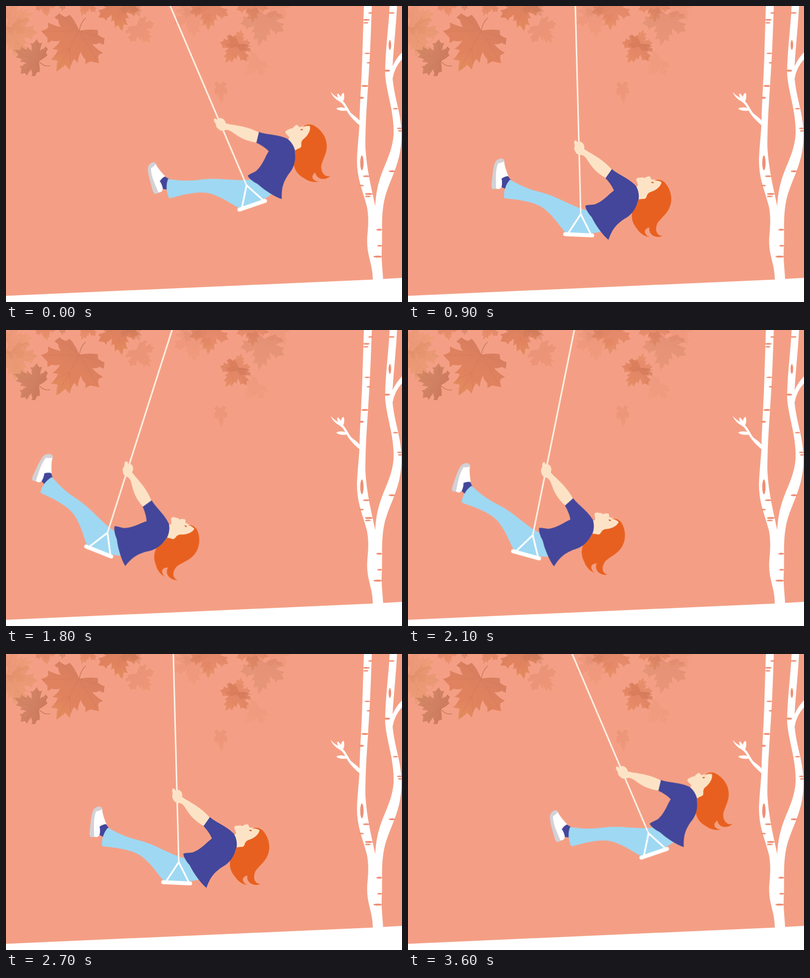
These frames come from a looping animation (800 px wide and 600 px high, 3.9 s). An HTML page:

```html
<!DOCTYPE html>
<html lang="en">
<head>
<meta charset="utf-8">
<title>Autumn swing</title>
<style>
  html, body { margin: 0; width: 100%; height: 100%; overflow: hidden; background: #f49f85; }
  svg { display: block; width: 800px; height: 600px; }

  /* Thirteen held poses per loop, there and back */
  #swing {
    transform-origin: 349px 422px;
    animation: swing 3.9s step-end infinite;
  }
  @keyframes swing {
    0%, 92.307%, 100%  { transform: translate(137px, -58.5px) rotate(-21.5deg); }
    7.692%, 84.615%    { transform: translate(92px, -39px) rotate(-14.6deg); }
    15.384%, 76.923%   { transform: translate(51px, -28.5px) rotate(-8.4deg); }
    23.076%, 69.23%    { transform: none; }
    30.769%, 61.538%   { transform: translate(-48px, -1px) rotate(6.3deg); }
    38.461%, 53.846%   { transform: translate(-97px, -6px) rotate(12.9deg); }
    46.153%            { transform: translate(-144px, -11px) rotate(19.1deg); }
  }

  .skin { fill: #fde3c6; }
  .navy { fill: #43469a; }
  .hair { fill: #e8601f; }
  .line { fill: none; stroke: #fff; stroke-linecap: round; stroke-linejoin: round; }
  .veins { fill: none; stroke: #b9623f; stroke-width: 1.2; opacity: .4; }
  .stem { fill: none; stroke: #c27a5c; stroke-width: 1.4; }
  .bark { fill: #f08f74; }
</style>
</head>
<body>
<svg viewBox="0 0 800 600" xmlns="http://www.w3.org/2000/svg">
  <defs>
    <linearGradient id="rust" gradientUnits="userSpaceOnUse" x1="0" y1="10" x2="0" y2="-100">
      <stop offset="0" stop-color="#cf7452"/>
      <stop offset=".55" stop-color="#db7850"/>
      <stop offset="1" stop-color="#de8850"/>
    </linearGradient>
    <linearGradient id="brown" gradientUnits="userSpaceOnUse" x1="0" y1="10" x2="0" y2="-100">
      <stop offset="0" stop-color="#bf6f52"/>
      <stop offset="1" stop-color="#cb8260"/>
    </linearGradient>
    <linearGradient id="gold" gradientUnits="userSpaceOnUse" x1="0" y1="10" x2="0" y2="-100">
      <stop offset="0" stop-color="#d98a5e"/>
      <stop offset="1" stop-color="#e39c60"/>
    </linearGradient>
    <path id="half" d="M-.4 -100H0Q7 -88 9 -78L23 -83Q18 -69 20 -58L31 -62Q25 -50 25 -38Q33 -46 41 -47L46 -56L52 -46L71 -40Q63 -33 61 -26L67 -17Q52 -17 38 -12Q47 -8 50 -2L60 -1L55 12Q44 10 39 12L34 20Q17 14 0 0H-.4Z"/>
    <g id="leaf">
      <use href="#half"/>
      <use href="#half" transform="scale(-1 1)"/>
      <path class="veins" d="M0 0V-94M0 0L64 -37M0 0L-64 -37M0 0L49 9M0 0L-49 9M0 -42L19 -72M0 -42L-19 -72"/>
    </g>
  </defs>

  <rect width="800" height="600" fill="#f49f85"/>

  <g id="leaves">
    <use href="#leaf" fill="url(#gold)" opacity=".4" transform="translate(10 44) rotate(160) scale(.68)"/>
    <use href="#leaf" fill="url(#gold)" opacity=".3" transform="translate(5 28) rotate(75) scale(.52)"/>
    <use href="#leaf" fill="url(#rust)" opacity=".45" transform="translate(78 -8) rotate(170) scale(.3)"/>
    <use href="#leaf" fill="url(#brown)" opacity=".5" transform="translate(116 -18) rotate(185) scale(.29)"/>
    <use href="#leaf" fill="url(#rust)" opacity=".5" transform="translate(166 -10) rotate(205) scale(.33)"/>
    <use href="#leaf" fill="url(#rust)" opacity=".7" transform="translate(224 -8) rotate(170) scale(.6)"/>
    <use href="#leaf" fill="url(#brown)" opacity=".35" transform="translate(250 -14) rotate(150) scale(.42)"/>
    <use href="#leaf" fill="url(#rust)" opacity=".25" transform="translate(264 40) rotate(142) scale(.45)"/>
    <use href="#leaf" fill="url(#rust)" opacity=".72" transform="translate(148 50) rotate(209) scale(.95)"/>
    <path class="stem" d="M148 50Q151 33 161 24"/>
    <use href="#leaf" fill="url(#brown)" opacity=".72" transform="translate(66 112) rotate(-65) scale(.55)"/>
    <path class="stem" d="M66 112Q77 124 89 121"/>

    <use href="#leaf" fill="url(#rust)" opacity=".15" transform="translate(376 10) rotate(175) scale(.55)"/>
    <use href="#leaf" fill="url(#rust)" opacity=".5" transform="translate(412 -6) rotate(184) scale(.56)"/>
    <use href="#leaf" fill="url(#brown)" opacity=".18" transform="translate(375 -8) rotate(200) scale(.36)"/>
    <use href="#leaf" fill="url(#rust)" opacity=".58" transform="translate(470 77) rotate(215) scale(.47)"/>
    <use href="#leaf" fill="url(#rust)" opacity=".45" transform="translate(466 82) rotate(15) scale(.36)"/>
    <path class="stem" opacity=".5" d="M470 77Q482 83 494 81"/>
    <use href="#leaf" fill="url(#rust)" opacity=".48" transform="translate(497 -12) rotate(178) scale(.46)"/>
    <use href="#leaf" fill="url(#brown)" opacity=".28" transform="translate(522 18) rotate(190) scale(.64)"/>
    <use href="#leaf" fill="url(#rust)" opacity=".14" transform="translate(545 -4) rotate(150) scale(.4)"/>
    <use href="#leaf" fill="url(#rust)" opacity=".1" transform="translate(510 110) rotate(222) scale(.4)"/>
    <use href="#leaf" fill="url(#rust)" opacity=".2" transform="translate(433 160) rotate(176) scale(.2 .4)"/>
  </g>

  <path fill="#fff" d="M0 587.5L741 554.5L800 551V600H0Z"/>

  <g id="birch">
    <path fill="#fff" d="M723 0H739C737 60 735 110 732 150C730 190 726 230 726 285C728 330 739 372 746 406
      C748 364 758 341 770 312C780 287 784 268 783 248C782 208 768 172 766 138C766 90 773 45 775 0H790
      C788 40 783 85 781 122Q788 106 800 94V108Q785 124 781 147C785 190 799 218 799 262C799 322 773 352 764 395
      C757 430 761 462 759 495C758 515 761 535 762 556H741C741 520 727 505 730 465C732 445 733 425 729 406
      C720 372 709 350 709 312C710 285 713 262 714 240C715 190 719 140 720 95Z"/>
    <path fill="#fff" d="M716 243C702 232 693 221 688 212C681 213 673 213 667 208C673 205 679 205 685 207
      C682 200 678 196 673 193C665 189 659 182 656 174C661 180 666 184 672 186C668 182 669 179 670 177
      C674 180 676 183 677 185C677 180 679 177 682 176C684 181 684 188 681 193C687 199 692 210 697 217
      C704 223 711 227 718 237Z"/>
    <g class="bark">
      <ellipse cx="737" cy="14" rx="5" ry="1.6"/>
      <ellipse cx="728" cy="28" rx="7" ry="1.8"/>
      <ellipse cx="727" cy="34" rx="5" ry="1.6"/>
      <ellipse cx="730" cy="96" rx="6" ry="1.5"/>
      <ellipse cx="733" cy="115" rx="4" ry="1.5"/>
      <ellipse cx="725" cy="162" rx="7" ry="2"/>
      <ellipse cx="718" cy="186" rx="5" ry="2"/>
      <ellipse cx="779" cy="14" rx="6" ry="1.6"/>
      <ellipse cx="770" cy="131" rx="6" ry="2"/>
      <ellipse cx="787" cy="208" rx="5" ry="1.6"/>
      <ellipse cx="795" cy="248" rx="5" ry="1.6"/>
      <ellipse cx="796" cy="253" rx="4" ry="1.5"/>
      <ellipse cx="780" cy="335" rx="7" ry="1.9"/>
      <ellipse cx="728" cy="345" rx="7" ry="1.8"/>
      <ellipse cx="718" cy="364" rx="5" ry="1.5"/>
      <ellipse cx="733" cy="381" rx="8" ry="2"/>
      <ellipse cx="731" cy="386" rx="6" ry="1.6"/>
      <ellipse cx="754" cy="453.5" rx="6" ry="1.9"/>
      <ellipse cx="755" cy="486" rx="5" ry="1.7"/>
      <ellipse cx="751" cy="508" rx="9" ry="2"/>
      <ellipse cx="719" cy="318" rx="3.4" ry="15"/>
      <ellipse cx="775.5" cy="79" rx="2.6" ry="10"/>
    </g>
  </g>

  <g id="swing">
    <path fill="#d2d1d5" d="M171 371Q168 369 169 360C171 342 172 327 176 317Q181 309 189 309Q195 310 195 316L186 371Z"/>
    <path fill="#fff" d="M182 319Q188 318 194 315C196 328 200 338 203 345C195 349 191 356 190 364Q188 371 182 371L178 370C178 350 176 334 182 319Z"/>
    <path class="navy" d="M189 350Q196 345 202 345L208 353Q198 360 197 371L189 367Q191 358 189 350Z"/>
    <path fill="#9fd8f3" d="M206 352C225 363 244 372 270 378C302 386 328 405 360 414L372 412L390 457C375 462 355 462 318 459
      C308 448 298 432 285 420C270 403 250 398 228 394C215 391 205 392 194 389C193 376 197 362 206 352Z"/>
    <path class="line" stroke-width="3" style="stroke:#fff3e8" d="M349 422L336 -78"/>
    <path class="skin" d="M337 283Q334 276 337 273Q340 271 342 276Q349 273 353 278Q357 282 356 290C370 300 393 309 413 333
      L400 349C380 338 371 326 361 310Q355 301 348 302Q340 301 338 295Q334 289 337 283Z"/>
    <path class="skin" d="M461 352Q462 348 467 348L475 347.5L478 349L481 346.5L488 345Q491 347 491 351.5L500 352L514 354V366
      L488 380Q483 392 474 392L467 396L460 368L465 363Z"/>
    <path class="hair" d="M496 354C505 351 513 352 519 358C530 370 534 388 531 400C527 420 512 428 504 440
      C498 453 502 466 514 466C506 470 495 468 490 461Q486 455 488 449C481 450 477 455 479 460Q482 467 489 468
      C478 468 468 460 463 452C453 440 451 430 453 418C458 410 464 402 466 392L474 391Q481 392 482 386Q484 379 490 377
      C504 373 512 363 512 357Q505 353 496 354Z"/>
    <path d="M491 357Q494 355 497 358Q494 361 491 357Z" fill="#c9672c"/>
    <path class="navy" d="M412 330.5C423 341 446 349 460 364C466 373 467 384 466 391C461 410 453 423 438 431
      C424 440 413 450 405 474C393 464 380 446 371 428Q360 416 358 405C364 402 374 404 380 401
      C396 394 405 382 416 374C413 366 406 356 399 349Z"/>
    <path class="line" stroke-width="3.5" d="M324 460L349 422L369 462"/>
    <path class="line" stroke-width="8" d="M317.5 462.5L372 465"/>
  </g>
</svg>
</body>
</html>
```
